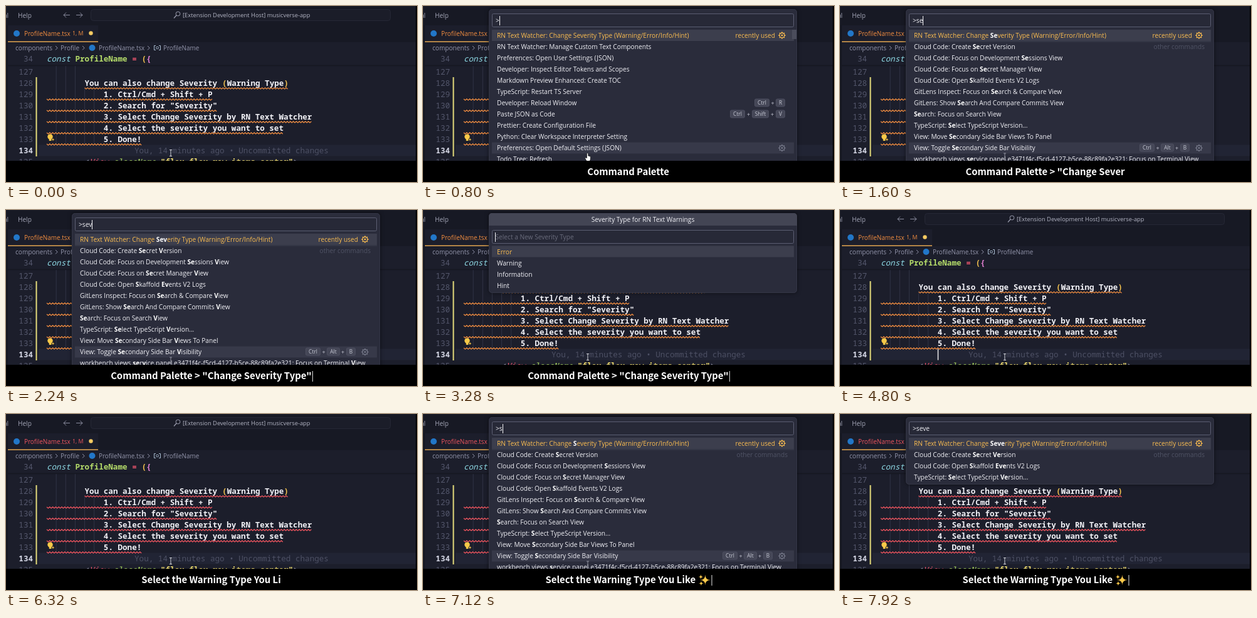
Recreate the animation shown at these times as an HTML page with a canvas. Size 656 by 282 pixels, loop 8000 ms.

```html
<!DOCTYPE html>
<html lang="en">
<head>
<meta charset="utf-8">
<title>Severity picker</title>
<style>
html, body { margin: 0; width: 100%; height: 100%; overflow: hidden; background: #000; }
canvas { display: block; width: 656px; height: 282px; }
</style>
</head>
<body>
<canvas id="stage"></canvas>
<script>
const W = 656, H = 282, LOOP = 8000;
const canvas = document.getElementById("stage");
const ratio = window.devicePixelRatio || 1;
canvas.width = W * ratio;
canvas.height = H * ratio;
const ctx = canvas.getContext("2d");

const UI = '"Open Sans", "Noto Sans", sans-serif';
const MONO = '12.6px "Noto Sans Mono", "DejaVu Sans Mono", monospace';
const CAPTION = 'bold 14.85px "Noto Sans CJK SC", "Noto Sans CJK JP", "Noto Sans", sans-serif';
const CHAR = 7.57, CODE_X = 65, ROW = 18, LIST = 10.18;
const ORANGE = "#f28d40", RED = "#f0555f", GOLD = "#fbbd50", BLUE = "#2277c8";
const BRIGHT = "#f1f1f6";

// Moments of the story, in ms
const OPEN = 560, PICK = 3020, CLOSE = 4400, TURN_RED = 5240, REOPEN = 6450;
const KEYS = [[OPEN, ""], [1440, "s"], [1600, "se"], [1750, "sev"], [2500, "seve"]];
const KEYS_AGAIN = [[REOPEN, ""], [7120, "s"], [7240, "se"], [7340, "sev"], [7420, "seve"]];
const CAPTIONS = [
  { from: 78, to: 4460, text: 'Command Palette > "Change Severity Type"' },
  { from: 4860, to: LOOP, text: "Select the Warning Type You Like ✨" }
];

const STEPS = [
  "1. Ctrl/Cmd + Shift + P",
  '2. Search for "Severity"',
  "3. Select Change Severity by RN Text Watcher",
  "4. Select the severity you want to set",
  "5. Done!"
];

// Asterisks enclose the matched letters
const RECENT = [
  "RN Text Watcher: Change Severity Type (Warning/Error/Info/Hint)",
  "RN Text Watcher: Manage Custom Text Components",
  "Preferences: Open User Settings (JSON)",
  "Developer: Inspect Editor Tokens and Scopes",
  "Markdown Preview Enhanced: Create TOC",
  "TypeScript: Restart TS Server",
  "Developer: Reload Window",
  "Paste JSON as Code",
  "Prettier: Create Configuration File",
  "Python: Clear Workspace Interpreter Setting",
  "Preferences: Open Default Settings (JSON)",
  "Todo Tree: Refresh"
];
const MATCHES = [
  "RN Text Watcher: Change *Sev*erity Type (Warning/Error/Info/Hint)",
  "Cloud Code: Create *Se*cret *V*ersion",
  "Cloud Code: Focus on Development *Se*ssions *V*iew",
  "Cloud Code: Focus on *Se*cret Manager *V*iew",
  "Cloud Code: Open *S*kaffold *Ev*ents V2 Logs",
  "GitLens Inspect: Focus on *Se*arch & Compare *V*iew",
  "GitLens: Show *Se*arch And Compare Commits *V*iew",
  "*Se*arch: Focus on Search *V*iew",
  "TypeScript: *Se*lect TypeScript *V*ersion...",
  "View: Move *Se*condary Side Bar *V*iews To Panel",
  "View: Toggle *Se*condary Side Bar *V*isibility",
  "workbench.views.*se*r*v*ice.panel.e3471f4c-f5cd-4127-b5ce-88c89fa2e321: Focus on Terminal *V*iew"
];
const FEW = [
  "RN Text Watcher: Change *Seve*rity Type (Warning/Error/Info/Hint)",
  "Cloud Code: Create *Se*cret *Ve*rsion",
  "Cloud Code: Open *S*kaffold *Eve*nts V2 Logs",
  "TypeScript: *Se*lect TypeScript *Ve*rsion..."
];

const ui = (size, weight = 400) => `${weight} ${size}px ${UI}`;

function rect(x, y, w, h, color) {
  ctx.fillStyle = color;
  ctx.fillRect(x, y, w, h);
}

function box(x, y, w, h, r, fill, stroke) {
  ctx.beginPath();
  ctx.roundRect(x, y, w, h, r);
  if (fill) { ctx.fillStyle = fill; ctx.fill(); }
  if (stroke) { ctx.strokeStyle = stroke; ctx.lineWidth = 1; ctx.stroke(); }
}

function dot(x, y, r, color) {
  ctx.beginPath();
  ctx.arc(x, y, r, 0, Math.PI * 2);
  ctx.fillStyle = color;
  ctx.fill();
}

function line(points, color, width = 1) {
  ctx.beginPath();
  points.forEach(([x, y], i) => i ? ctx.lineTo(x, y) : ctx.moveTo(x, y));
  ctx.strokeStyle = color;
  ctx.lineWidth = width;
  ctx.stroke();
}

function text(s, x, y, font, color, align = "left") {
  ctx.font = font;
  ctx.fillStyle = color;
  ctx.textAlign = align;
  ctx.fillText(s, x, y);
  return ctx.measureText(s).width;
}

// Runs of [string, colour, style] on the code grid
function code(runs, col, y) {
  for (const [s, color, style = "600"] of runs) {
    text(s, CODE_X + col * CHAR, y + 4.8, `${style} ${MONO}`, color);
    col += s.length;
  }
}

function squiggle(x0, x1, y, color) {
  const pts = [];
  for (let x = x0, i = 0; x <= x1; x += 2.4, i++) pts.push([x, y + (i % 2 ? 1 : -1)]);
  line(pts, color, 1.3);
}

function gear(x, y, color) {
  for (let i = 0; i < 8; i++) {
    const a = i * Math.PI / 4, c = Math.cos(a), s = Math.sin(a);
    line([[x + c * 3.8, y + s * 3.8], [x + c * 5.6, y + s * 5.6]], color, 1.7);
  }
  ctx.beginPath();
  ctx.arc(x, y, 3.9, 0, Math.PI * 2);
  ctx.lineWidth = 1.1;
  ctx.stroke();
  dot(x, y, 1.4, color);
}

function sparkle(x, y, r) {
  ctx.beginPath();
  ctx.moveTo(x, y - r);
  for (let i = 1; i <= 4; i++) {
    const a = -Math.PI / 2 + i * Math.PI / 2;
    ctx.quadraticCurveTo(x, y, x + Math.cos(a) * r, y + Math.sin(a) * r);
  }
  ctx.fillStyle = "#fbc94a";
  ctx.fill();
}

const blink = (t, since, half = 500) => Math.floor((t - since) / half) % 2 === 0;

function titleBar(busy) {
  rect(0, 0, W, 31, "#171924");
  text("al", -4, 18.5, ui(10.1), "#a3a5b6");
  text("Help", 19, 18.5, ui(10.1), "#a3a5b6");
  if (busy) return;
  for (const [x, d] of [[92, -1], [112, 1]]) {
    const tip = d < 0 ? x : x + 10;
    line([[x, 14.5], [x + 10, 14.5]], "#8b8da0");
    line([[tip - d * 4, 10.5], [tip, 14.5], [tip - d * 4, 18.5]], "#8b8da0");
  }
  box(135.5, 5.5, 478, 18, 4, "#1b1d29", "#262836");
  ctx.beginPath();
  ctx.arc(274.5, 12.5, 3.4, 0, Math.PI * 2);
  ctx.strokeStyle = "#9a9cae";
  ctx.lineWidth = 1;
  ctx.stroke();
  line([[272, 15], [268, 19.5]], "#9a9cae", 1.2);
  text("[Extension Development Host] musicverse-app", 282, 18, ui(9.35), "#b4b6c5");
}

function tabs(mark) {
  rect(0, 31, W, 27, "#171924");
  rect(3, 31, 144, 26, "#1c1e2b");
  rect(3, 56.5, 144, 1.5, "#e3a64f");
  dot(17, 44, 5, BLUE);
  text("ProfileName.tsx", 29, 47.5, ui(9.95), mark);
  text("1, M", 106, 47, ui(8.8), mark);
  dot(135.5, 43.5, 3.2, "#f6cb62");
  const dim = "#9395ab";
  text("components", 15, 70.8, ui(10.1), dim);
  text("Profile", 87, 70.8, ui(10), dim);
  dot(137.5, 67, 5, BLUE);
  text("ProfileName.tsx", 148, 70.8, ui(9.9), dim);
  text("ProfileName", 251, 70.8, ui(9.9), dim);
  for (const x of [79, 122, 226]) line([[x, 64], [x + 3.2, 67.2], [x, 70.4]], dim);
  line([[239, 63.5], [236.5, 63.5], [236.5, 70.5], [239, 70.5]], "#a9bcd0");
  line([[244, 63.5], [246.5, 63.5], [246.5, 70.5], [244, 70.5]], "#a9bcd0");
  box(239.5, 65.5, 4, 3, 1, null, "#a9bcd0");
}

function editor(t, mark) {
  const busy = (t >= OPEN && t < CLOSE) || t >= REOPEN;
  rect(0, 58, W, 190, "#1c1e2b");
  titleBar(busy);
  tabs(mark);
  rect(0, 31, 2.5, 217, "#141620");

  rect(52, 222.5, W - 52, 18, "#212434");
  for (let i = 1; i <= 5; i++) {
    const top = i < 4 ? 96 : 132;
    rect(CODE_X + i * 2 * CHAR - 0.5, top, 1, 222 - top, "#313446");
  }
  rect(3, 94.5, W - 3, 2, "rgba(0,0,0,.2)");
  const number = (n, y) => n === 134
    ? text(n, 43, y + 4.8, "600 " + MONO, "#d6d8e6", "right")
    : text(n, 43, y + 4.8, MONO, "#54576c", "right");
  number(34, 84);
  for (let n = 127; n <= 135; n++) number(n, 105 + (n - 127) * ROW);
  rect(47.5, 114, 2, 127, "#e6dc7c");

  code([["const", "#8fdbe6", "italic 500"], [" ProfileName", "#b5dc6a"], [" =", "#f0566f"],
    [" (", "#f2c14e"], ["{", "#e07fd0"]], 0, 84);
  code([["You can also change Severity ", BRIGHT], ["(", "#f2c14e"],
    ["Warning Type", BRIGHT], [")", "#f2c14e"]], 8, 123);
  squiggle(CODE_X + 8 * CHAR, 451, 132, mark);
  STEPS.forEach((s, i) => {
    const y = 141 + i * ROW;
    code([[s, BRIGHT]], 12, y);
    squiggle(CODE_X, CODE_X + (12 + s.length) * CHAR, y + 8.9, mark);
  });
  code([["You, 14 minutes ago • Uncommitted changes", "#4d5064", "400"]], 18.5, 231);
  code([["<", "#8f91a5"], ["View", "#f0566f", "italic 500"], [" className", "#a9d65f", "italic 500"],
    ["=", "#f0566f"], ['"flex flex-row items-center"', "#e5d36c"], [">", "#8f91a5"]], 8, 249);

  dot(70.5, 209.5, 4.2, "#f7c948");
  rect(68.8, 213, 3.6, 3, "#f7c948");
  sparkle(75, 214, 3);

  const idle = (t >= 240 && t < OPEN) || (t >= CLOSE && t < REOPEN && blink(t, CLOSE));
  if (idle) rect(155.8, 222.5, 1.4, 18, "#f4f4f6");
  rect(654, 0, 2, 248, "#000");
}

function panel(bottom) {
  ctx.save();
  ctx.shadowColor = "rgba(0,0,0,.5)";
  ctx.shadowBlur = 6 * ratio;
  box(105, 5, 492, bottom - 5, 5, "#2a2c3b");
  ctx.restore();
  box(105.5, 5.5, 491, bottom - 6, 5, null, "#343646");
}

function field(y) {
  box(110.5, y + 0.5, 481, 21, 2, "#272937", "#5b5e72");
}

function marked(s, x, y, color) {
  s.split("*").forEach((part, i) => {
    x += text(part, x, y, ui(LIST, i % 2 ? 700 : 400), i % 2 ? "#fff" : color);
  });
}

function keycaps(keys, y) {
  for (const [label, x, w] of keys) {
    if (label === "+") {
      text("+", x, y + 3.3, ui(9), "#c6c8d4", "center");
      continue;
    }
    box(x + 0.5, y - 6.5, w - 1, 12, 2, "#454757", "#4d4f60");
    text(label, x + w / 2, y + 2.8, ui(8.4), "#c6c8d4", "center");
  }
}

function palette(t, keys) {
  const [since, typed] = keys.filter(k => k[0] <= t).pop();
  const rows = typed === "" ? RECENT : typed === "seve" ? FEW : MATCHES;
  const long = rows !== FEW;
  panel(long ? 262 : 113);
  field(12);
  const w = text(">" + typed, 116, 27.3, ui(LIST), BRIGHT);
  if (blink(t, since)) rect(Math.round(116 + w), 16, 1, 15, "#f4f4f6");

  rect(110, 38, 482, 18, "#3c3e4d");
  if (long) rect(110, 218.5, 482, 18, "#373949");
  rows.forEach((s, i) => {
    const y = 47 + i * ROW + (i ? 0.5 : 0);
    // Only letters typed so far stand out
    const label = typed.length < 3 ? s.replace(/\*([^*]*)\*/g, (m, g) =>
      /^s/i.test(g) ? `*${g.slice(0, typed.length)}*${g.slice(typed.length)}` : g) : s;
    marked(label, 118, y + 3.8, i ? BRIGHT : GOLD);
  });
  text("recently used", 562, 50.8, ui(LIST), GOLD, "right");
  gear(573, 47, GOLD);

  if (rows === RECENT) {
    rect(589, 38, 7, 15, "#4b4d5c");
    keycaps([["Ctrl", 529, 24], ["+", 558], ["R", 563, 15]], 155.5);
    keycaps([["Ctrl", 490, 24], ["+", 519.5], ["Shift", 525, 27], ["+", 557.5], ["V", 563, 15]], 173.5);
    gear(573, 227.5, "#777a8b");
  } else {
    rect(110, 56.5, 482, 1, "#3d4050");
    text("other commands", 582, 69.3, ui(LIST), "#505365", "right");
    if (long) {
      keycaps([["Ctrl", 478, 24], ["+", 507], ["Alt", 512, 21], ["+", 537.5], ["B", 543, 15]], 227.5);
      gear(573, 227.5, "#777a8b");
    }
  }
  return long ? (rows === RECENT ? "hand" : "low") : "beam";
}

function picker(t) {
  panel(133);
  box(105, 5, 492, 20, [5, 5, 0, 0], "#434554");
  text("Severity Type for RN Text Warnings", 351, 19.3, ui(LIST), BRIGHT, "center");
  field(32);
  text("Select a New Severity Type", 115.5, 46.8, ui(LIST), "#6a6c7c");
  if (blink(t, PICK)) rect(115, 36, 1, 15, "#f4f4f6");
  rect(110, 57.5, 482, 18, "#3c3e4d");
  ["Error", "Warning", "Information", "Hint"].forEach((s, i) =>
    text(s, 118, 70.5 + i * 18.1, ui(LIST), i ? BRIGHT : GOLD));
}

function pointer(kind) {
  if (kind === "hand") {
    ctx.beginPath();
    ctx.moveTo(261.5, 243);
    ctx.lineTo(261.5, 236.5);
    ctx.quadraticCurveTo(262.6, 235, 263.7, 236.5);
    ctx.lineTo(263.7, 240);
    ctx.lineTo(267.5, 241.2);
    ctx.lineTo(267.2, 246);
    ctx.lineTo(266, 249);
    ctx.lineTo(261.6, 249);
    ctx.lineTo(258.6, 244);
    ctx.quadraticCurveTo(259.3, 242, 261.5, 243.6);
    ctx.closePath();
    ctx.fillStyle = "#fff";
    ctx.fill();
    ctx.strokeStyle = "#111";
    ctx.lineWidth = 0.7;
    ctx.stroke();
    return;
  }
  const y = kind === "low" ? 241 : 235.5;
  const color = kind === "low" ? "#8d8f9c" : "#d6d7de";
  line([[263, y - 5], [263, y + 5]], color);
  for (const e of [-5, 5]) line([[261, y + e], [265, y + e]], color);
}

function caption(t) {
  const c = CAPTIONS.find(c => t >= c.from && t < c.to);
  if (!c) return;
  const shown = [...c.text].slice(0, Math.floor((t - c.from) / 48)).join("").trimEnd();
  const star = shown.endsWith("✨");
  const words = star ? shown.slice(0, -1) : shown;
  ctx.font = CAPTION;
  const wordsWidth = ctx.measureText(words).width;
  const width = wordsWidth + (star ? 21 : 0);
  const x = 327.5 - width / 2;
  text(words, x, 271, CAPTION, "#fff");
  if (star) {
    const sx = x + wordsWidth;
    sparkle(sx + 12, 266, 8.5);
    sparkle(sx + 5, 261, 4.2);
    sparkle(sx + 5.5, 271.5, 4.2);
  }
  if (blink(t, c.from, 485)) rect(x + width + 1, 258, 1, 17, "#e6e6e6");
}

function draw(t) {
  ctx.setTransform(ratio, 0, 0, ratio, 0, 0);
  rect(0, 0, W, H, "#000");
  ctx.save();
  ctx.beginPath();
  ctx.rect(0, 0, W, 248);
  ctx.clip();
  editor(t, t >= TURN_RED ? RED : ORANGE);
  let kind = "beam";
  if (t >= OPEN && t < PICK) kind = palette(t, KEYS);
  else if (t >= PICK && t < CLOSE) picker(t);
  else if (t >= REOPEN) kind = palette(t, KEYS_AGAIN);
  pointer(kind);
  ctx.restore();
  caption(t);
}

const start = performance.now();
function tick() {
  draw((performance.now() - start) % LOOP);
  requestAnimationFrame(tick);
}
tick();
</script>
</body>
</html>
```
